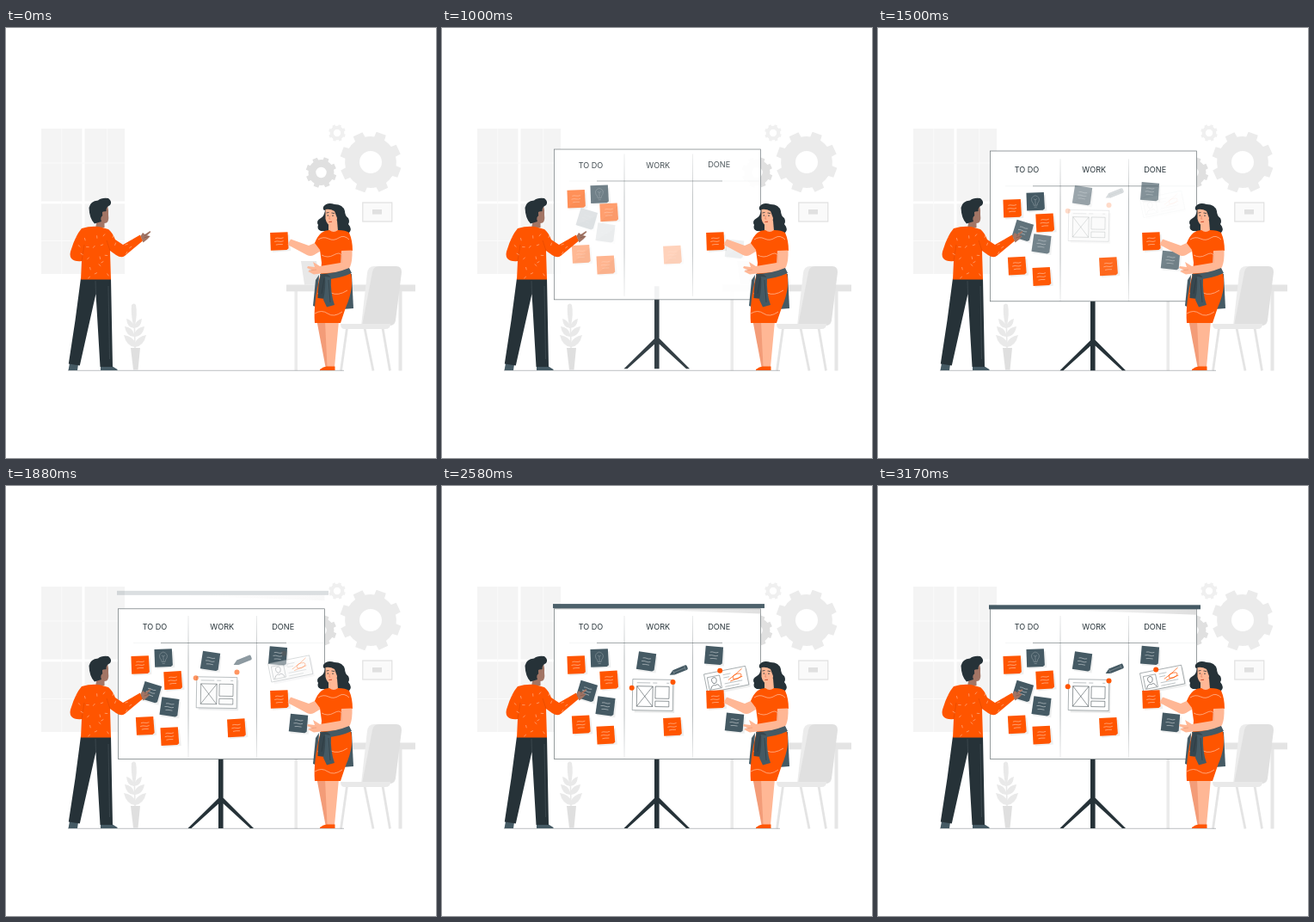
An HTML page with a canvas for the animation above (3210 ms loop, 500x500 px).

```html
<!DOCTYPE html>
<html lang="en">
<head>
<meta charset="utf-8">
<title>Task board</title>
<style>
html, body { margin: 0; width: 100%; height: 100%; overflow: hidden; background: #fff; }
canvas { display: block; width: 500px; height: 500px; }
</style>
</head>
<body>
<canvas id="stage"></canvas>
<script>
const LOOP = 3210;
const ORANGE = '#ff5500', INK = '#263238', SLATE = '#455a64', SKIN = '#ffb795', BROWN = '#a27565';
const canvas = document.getElementById('stage');
const c = canvas.getContext('2d');
const dpr = window.devicePixelRatio || 1;
canvas.width = canvas.height = 500 * dpr;

// ---- helpers ----
function fill(color, d) {
  c.fillStyle = color;
  c.fill(new Path2D(d));
}
function line(color, width, d) {
  c.strokeStyle = color;
  c.lineWidth = width;
  c.stroke(new Path2D(d));
}
function rect(color, x, y, w, h) {
  c.fillStyle = color;
  c.fillRect(x, y, w, h);
}
function dot(color, x, y, r) {
  c.fillStyle = color;
  c.beginPath();
  c.arc(x, y, r, 0, 7);
  c.fill();
}
function at(x, y, deg, draw) {
  c.save();
  c.translate(x, y);
  c.rotate(deg * Math.PI / 180);
  draw();
  c.restore();
}

// cubic-bezier(.36, -.01, .5, 1.38)
function ease(x) {
  if (x <= 0) return 0;
  if (x >= 1) return 1;
  const bez = (a, b, s) => 3 * (1 - s) * (1 - s) * s * a + 3 * (1 - s) * s * s * b + s * s * s;
  let lo = 0, hi = 1;
  for (let i = 0; i < 24; i++) {
    const mid = (lo + hi) / 2;
    if (bez(.36, .5, mid) < x) lo = mid; else hi = mid;
  }
  return bez(-.01, 1.38, lo);
}

// fade in while sliding down to the resting place
function drop(t, start, span, dist, draw) {
  const p = ease((t - start) / span);
  if (p < .05) return;
  c.save();
  c.globalAlpha = Math.min(1, p);
  c.translate(0, (p - 1) * dist);
  draw();
  c.restore();
}

// ---- room ----
function gear(x, y, r, hole, color) {
  const n = 8, step = Math.PI * 2 / n, inner = r * .83;
  c.beginPath();
  for (let i = 0; i < n; i++) {
    const a = (i + .5) * step - .04;
    [[-.27, inner], [-.21, r], [.21, r], [.27, inner]].forEach(([k, q]) =>
      c.lineTo(x + Math.cos(a + k * step) * q, y + Math.sin(a + k * step) * q));
    c.arc(x, y, inner, a + .27 * step, a + .73 * step);
  }
  c.closePath();
  c.moveTo(x + hole, y);
  c.arc(x, y, hole, 0, Math.PI * 2);
  c.fillStyle = color;
  c.fill('evenodd');
}

function room() {
  rect('#f4f4f4', 41, 117, 97, 169);
  rect('#fff', 88.5, 117, 3, 169);
  rect('#fff', 41, 201.5, 97, 2.8);
  [64.2, 117.2].forEach(x => rect('#fbfbfb', x, 117, 1, 169));
  [156.6, 247].forEach(y => rect('#fbfbfb', 41, y, 97, 1));

  gear(424, 156, 36, 13, '#ebebeb');
  gear(366.5, 168, 18, 6.2, '#e0e0e0');
  gear(385, 122, 10, 4.2, '#f0f0f0');

  c.fillStyle = '#fafafa';
  c.fillRect(414.8, 203, 34, 22);
  c.strokeStyle = '#e0e0e0';
  c.lineWidth = 1.2;
  c.strokeRect(414.8, 203, 34, 22);
  rect('#e0e0e0', 426, 211, 11, 5.6);

  // desk and laptop
  rect('#ebebeb', 335.5, 306, 3.5, 92.5);
  rect('#e6e6e6', 456.5, 306, 4, 92.5);
  fill('#e8e8e8', 'M343 271H361L366 298.5H347Z');
  rect('#e4e4e4', 326, 298.5, 150, 7.8);

  // chair
  line('#e4e4e4', 2.8, 'M396.5 349L389.5 398.5M417 349L427 398.5M438 349L446.5 398.5');
  fill('#ececec', 'M413 346L420 285Q421 277 428 277H440L430 346Z');
  fill('#e0e0e0', 'M414 346L426 284Q427 277 434 277H454Q460 277 460 284L453 340Q452 346 446 346Z');
  fill('#e9e9e9', 'M389 344H447Q447 350 441 350H394Q389 350 389 344Z');

  // plant
  const leaf = '#e9e9e9';
  fill(leaf, 'M146 322Q149 319 151 322Q153 332 150 346H148Q145 332 146 322Z');
  fill(leaf, 'M149 349Q141 349 140 338Q147 340 149 347Q151 340 158 338Q157 349 149 349Z');
  fill(leaf, 'M149 359Q140 359 138 347Q147 348 149 356Q152 348 161 347Q159 359 149 359Z');
  fill(leaf, 'M150 371Q140 370 137 357Q148 359 150 366Q153 359 163 357Q160 370 150 371Z');
  line(leaf, 1.6, 'M149 330L150 373');
  fill('#dfdfdf', 'M145 372H156L153.5 397.5H148Z');

  line('#8d9497', .6, 'M72 398.3H393');
}

// ---- people ----
const shirt = 'M88 233Q98 230 108 231L119 234Q124 238 127 246L136 252L156 240.5L159 247.5L138 265Q134 268 128 264L121 259L122 292.5H87L88 271Q80 272 76 268Q73 264 76 257Q81 241 88 233Z';

function flecks() {
  let seed = 11;
  const rnd = () => (seed = seed * 16807 % 2147483647) / 2147483647;
  c.save();
  c.clip(new Path2D(shirt));
  let d = '';
  for (let y = 238; y < 292; y += 11) {
    for (let x = 80; x < 156; x += 11) {
      const px = x + rnd() * 7, py = y + rnd() * 7, a = rnd() * Math.PI;
      d += `M${px} ${py}l${Math.cos(a) * 3.4} ${Math.sin(a) * 3.4}`;
    }
  }
  line('#ffc3a3', .6, d);
  c.restore();
}

function man() {
  fill(SLATE, 'M74 390L84 391L83 398H72.5Z');
  fill(SLATE, 'M110 393H123L129.5 397V398H110Z');
  fill(INK, 'M87 291H122L124 394H109.5L104.5 309L85.8 392.5L72.8 390.5Q81 340 87 291Z');
  line('#4f5b61', .5, 'M104 294L104.5 309M119 300L120.5 385');
  fill(BROWN, 'M106 222L113 210L118 206Q119.5 212 119 217Q120 225 117 226.5L114.5 227V232L104 233Z');
  fill(INK, 'M96.5 209Q98 201 107 200.5Q111 197 119 198Q124 202 121 206Q116 208 116.5 213L112 214L112.5 218Q109 220 111 225L103 227.5Q97 222 96.5 209Z');
  fill(BROWN, 'M112 214Q116 212 116 217L112.5 219Z');
  fill(ORANGE, shirt);
  line('#d94400', .5, 'M88 271L91 252M121 259L117 247');
  flecks();
  fill(BROWN, 'M156.5 242L159 238L161.5 240L167.5 236L168.3 237.3L164 241.2L167.8 242L164.5 245.5L159.5 249.5Z');
  line('#6f4b40', .5, 'M160.5 244L166 242.3M161 241.5L163 240');
}

function woman() {
  // jacket behind the skirt
  fill(SLATE, 'M389 287L402 286L404 326L391 327Z');
  fill(SLATE, 'M364 287L360 293L357 323L362 325Z');

  // legs and shoes
  fill('#f39c78', 'M361.5 341H377L378 394H371.5Z');
  fill(SKIN, 'M371 341H387L382 394H373.5Z');
  fill(ORANGE, 'M365 397Q369 393.5 373 393.5H382.5V398H365Z');

  // hair, neck, face
  fill(INK, 'M369 208Q373 202 382 205Q392 205 394 213Q394 218 398 221Q400 225 398 228Q403 234 399 238Q393 241 387 237L366 236Q361 234 363 229Q360 224 366 221Q370 219 371 212Q368 212 369 208Z');
  fill(SKIN, 'M375 226L385 224L386 236Q381 239 375 237Z');
  fill(SKIN, 'M371.5 211Q377 210 382 213L385 221Q385 229 378.5 230Q373 229 371.5 222Z');
  line(INK, .8, 'M372.5 215L375.5 214.5M378.5 215L382 215.5');
  dot(INK, 374.3, 218, .7);
  dot(INK, 380, 218.3, .7);
  line('#d9785a', .6, 'M376.5 218L375.7 222H377.3');
  line('#c63d20', .9, 'M375.5 225.5L379 225.2');

  // reaching arm
  fill(SKIN, 'M368 246L352 253L331 245.5L327.5 252L350 264Q354 266 358 264L368 258Z');

  // dress
  fill(ORANGE, 'M367 238Q371 235 376 235Q381 239 386 235Q395 235 399 238Q403 247 403 259L390 260L400 282Q406 300 395 325L389 343H359Q357 320 366 285L367 273L365 258L359 250Q362 242 367 238Z');
  line('#ffb695', .8, 'M363 246Q369 242 375 245T387 244T399 246M367 264Q374 268 381 264T390 264M362 309Q370 304 378 308T397 305M359 332Q367 327 374 332T391 330');

  // resting arm
  fill(SKIN, 'M390 259L402.5 258.5Q403 271 400 278Q396 284 386 284L366 285.5L358 286.5L351 283L356 281.5L350 279L351 277L359 278L357 272L365 277L389 273Z');
  line('#e08a67', .5, 'M352 282L361 281M390 273V262');

  // sash
  fill(SLATE, 'M365 286Q382 286 399 279L402 285Q385 293 366 292Z');
  fill('#37474f', 'M366 287Q373 284 377 289L375 303L371 315L362.5 314Q362.5 298 366 287Z');
  fill(SLATE, 'M371 289L378 290Q377 308 382 322L373 324.5L369 316Q372 302 371 289Z');
  line(INK, .5, 'M370 291L367 309M375 293L377 319');
}

// ---- board ----
function note(x, y, deg, color, icon) {
  at(x, y, deg, () => {
    fill('rgba(38,50,56,.08)', 'M-9 9L12 -8L13 11.5L-8 12.5Z');
    fill(color, 'M-10.2 -10.4H10.2L10.6 8.6L8.4 10.4H-10.2Z');
    if (icon) line('rgba(255,255,255,.45)', .5, 'M-2 4.5Q-2 2 -4 0Q-6 -5 0 -7Q6 -5 4 0Q2 2 2 4.5ZM-1.6 6.5H1.6M0 4V-2L-2 -3M0 -2L2 -3');
    else line('rgba(255,255,255,.7)', .6, 'M-4.5 -3.5Q-2 -4.3 0 -3.6T5 -4M-5.5 .3Q-2 -.6 0 .2T5 -.2M-4 4Q-1 3.2 4 3.7');
  });
}

function panel() {
  fill(INK, 'M247 302H252.6V398H247ZM248 362L252 365L215.5 398H211.5ZM248 365L252 362L288 398H284Z');
  rect('#fff', 130.5, 142.8, 240, 174.8);
  c.strokeStyle = '#6a7276';
  c.lineWidth = .7;
  c.strokeRect(130.5, 142.8, 240, 174.8);
}

function rules() {
  const v = c.createLinearGradient(0, 150, 0, 317);
  v.addColorStop(0, 'rgba(38,50,56,.15)');
  v.addColorStop(.3, 'rgba(38,50,56,.55)');
  v.addColorStop(.7, 'rgba(38,50,56,.55)');
  v.addColorStop(1, 'rgba(38,50,56,.15)');
  line(v, .6, 'M212 151V316.5M291.5 151V316.5');
  line('rgba(38,50,56,.08)', .6, 'M148 182.5H370');
  line('rgba(38,50,56,.65)', .6, 'M180 182.5H326');
}

function label(text, x) {
  c.fillStyle = INK;
  c.font = '400 9.1px Inter, "Open Sans", sans-serif';
  c.textAlign = 'center';
  c.fillText(text, x, 166.7);
}

function wireframe() {
  at(245, 243, 1, () => {
    rect('rgba(38,50,56,.1)', -21, -15, 46.5, 35.5);
    rect('#fff', -23.5, -18, 47, 36);
    line('#5d686d', .5, 'M-23.5 -18H23.5V18H-23.5Z');
    line('#7c868b', .5, 'M-18.5 -14H-3M0 -14H5M16 -14H19');
    line(INK, .5, 'M-18.5 -10H0V13.5H-18.5ZM-18.5 -10L0 13.5M0 -10L-18.5 13.5M3 -10H19V4H3ZM3 7H19V13.5H3Z');
  });
}

function pencil() {
  at(275, 213, -22, () => {
    fill(SLATE, 'M-11.5 .8L-6 -2.9H9.5Q11 -2.9 11 -1V1.2Q11 2.9 9.5 2.9H-6Z');
    line('#9aa5aa', .5, 'M-6 -2.8V2.8M-6 0H8M8 -2.8V2.8');
  });
}

function card() {
  at(330.7, 223.8, -11.3, () => {
    rect('rgba(38,50,56,.08)', -22, -8, 48, 22);
    rect('#fff', -24.5, -11, 49, 22);
    line('#5d686d', .5, 'M-24.5 -11H24.5V11H-24.5Z');
    line('#5d686d', .5, 'M-21.5 -6.5H-7V8.5H-21.5Z');
    line(INK, .5, 'M-17 -1Q-17.5 -5 -14 -5Q-11 -5 -11.5 -1Q-12 2 -14.2 2Q-16.5 2 -17 -1ZM-20 8Q-19 4 -15.5 3.5L-14 4.5L-12.5 3.5Q-9 4 -8.5 8');
    line('#9aa3a7', .6, 'M-3 -6H6M-3 -2.5H4M-3 4.5H18M-3 8H14');
    line(ORANGE, .7, 'M2 1L12 -4L20 -9M8 1Q7 -4 14 -4Q20 -4 17 0Q13 3 8 1M4 3L19 0');
  });
}

function bar() {
  const g = c.createLinearGradient(190, 0, 371, 0);
  g.addColorStop(0, 'rgba(200,200,200,0)');
  g.addColorStop(1, 'rgba(200,200,200,.6)');
  fill(g, 'M190 143H370.5V149.5Z');
  rect(SLATE, 129, 138, 246, 5);
}

// x, y, tilt, colour, start, span, distance, icon
const NOTES = [
  [156, 208, -2, ORANGE, 340, 1450, 27],
  [183, 200, -2, SLATE, 315, 1350, 28, true],
  [194, 225.5, -3, ORANGE, 345, 1580, 26],
  [168.3, 238.6, 17, SLATE, 688, 1450, 20],
  [190, 256, 8, SLATE, 750, 1500, 20],
  [161.6, 277.4, -3, ORANGE, 427, 1660, 25],
  [190.2, 289.6, -3, ORANGE, 415, 1660, 25],
  [267.8, 279.8, -3, ORANGE, 560, 1620, 22],
  [237.5, 204, 9, SLATE, 900, 1500, 20],
  [316, 197, 5, SLATE, 825, 1480, 20],
  [340, 275, 6, SLATE, 770, 1450, 20]
];

function draw(t) {
  c.setTransform(dpr, 0, 0, dpr, 0, 0);
  rect('#fff', 0, 0, 500, 500);
  room();

  drop(t, 165, 1350, 27, panel);
  drop(t, 255, 1350, 28, rules);
  drop(t, 185, 1400, 28, () => label('TO DO', 173));
  drop(t, 210, 1400, 28, () => label('WORK', 251.2));
  drop(t, 260, 1350, 28, () => label('DONE', 322.2));
  for (const [x, y, deg, color, start, span, dist, icon] of NOTES) {
    drop(t, start, span, dist, () => note(x, y, deg, color, icon));
  }
  drop(t, 1130, 1350, 18, wireframe);
  drop(t, 1030, 1950, 26, () => {
    dot(ORANGE, 220.7, 233.2, 3);
    dot(ORANGE, 268.5, 226.5, 3);
    pencil();
  });
  drop(t, 1300, 1650, 20, card);
  drop(t, 1750, 1000, 20, () => dot(ORANGE, 323.2, 213.5, 3));
  drop(t, 1482, 1730, 20, bar);

  man();
  note(317.7, 248, -2, ORANGE);
  woman();
}

const begin = performance.now();
function tick() {
  draw((performance.now() - begin) % LOOP);
  requestAnimationFrame(tick);
}
tick();
</script>
</body>
</html>
```
